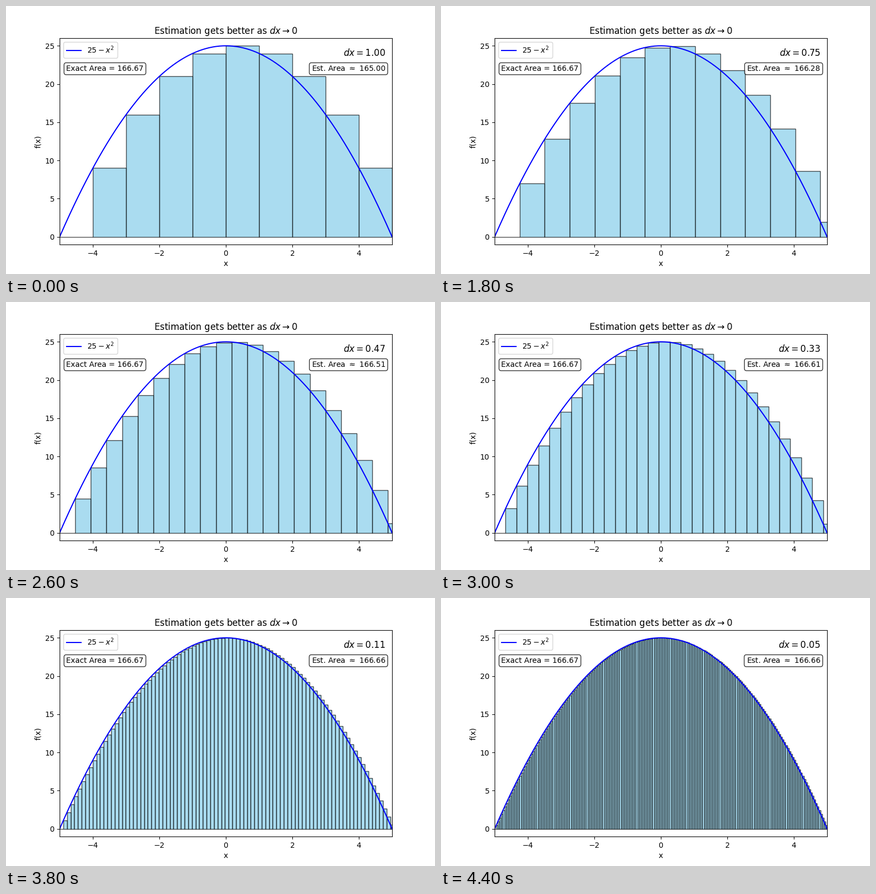
Recreate the animation shown at these times as a matplotlib script. Size 800 by 500 pixels, loop 6000 ms.

```python
import matplotlib.pyplot as plt
import numpy as np
from matplotlib.animation import FuncAnimation

INTERVAL = 100          # ms per frame
FRAMES = 60
HOLD = 5                # still frames before dx starts to shrink
STEPS = 39
DX_START, DX_END = 1.0, 0.05
LOW, HIGH = -5, 5


def f(x):
    return 25 - x**2


def step_width(frame):
    """Ease dx from its start to its end value with a smoothstep."""
    t = np.clip((frame - HOLD) / STEPS, 0, 1)
    return DX_START + (DX_END - DX_START) * t * t * (3 - 2 * t)


fig, ax = plt.subplots(figsize=(8, 5), dpi=100)
xs = np.linspace(LOW, HIGH, 400)
ax.plot(xs, f(xs), color="blue", label="$25 - x^2$")
ax.set_xlim(LOW, HIGH)
ax.set_ylim(-1, 26)
ax.set_xlabel("x")
ax.set_ylabel("f(x)")
ax.set_title(r"Estimation gets better as $dx \to 0$")
ax.legend(loc="upper left")


def corner_text(x, y, text="", **style):
    return ax.text(x, y, text, transform=ax.transAxes, va="top", **style)


box = dict(boxstyle="round", facecolor="white", alpha=0.8)
exact_area = 500 / 3
corner_text(0.02, 0.87, f"Exact Area = {exact_area:.2f}", bbox=box)
dx_text = corner_text(0.98, 0.95, ha="right", fontsize=12)
area_text = corner_text(0.98, 0.87, ha="right", bbox=box)

bars = []


def update(frame):
    for bar in bars:
        bar.remove()
    dx = step_width(frame)
    left = np.arange(LOW, HIGH, dx)
    heights = f(left)
    bars[:] = ax.bar(left, heights, width=dx, align="edge", color="skyblue",
                     edgecolor="black", alpha=0.7)
    dx_text.set_text(f"$dx = {dx:.2f}$")
    area_text.set_text(rf"Est. Area $\approx$ {heights.sum() * dx:.2f}")
    return [*bars, dx_text, area_text]


anim = FuncAnimation(fig, update, frames=FRAMES, interval=INTERVAL,
                     init_func=lambda: update(0), repeat=True)
plt.show()
```
